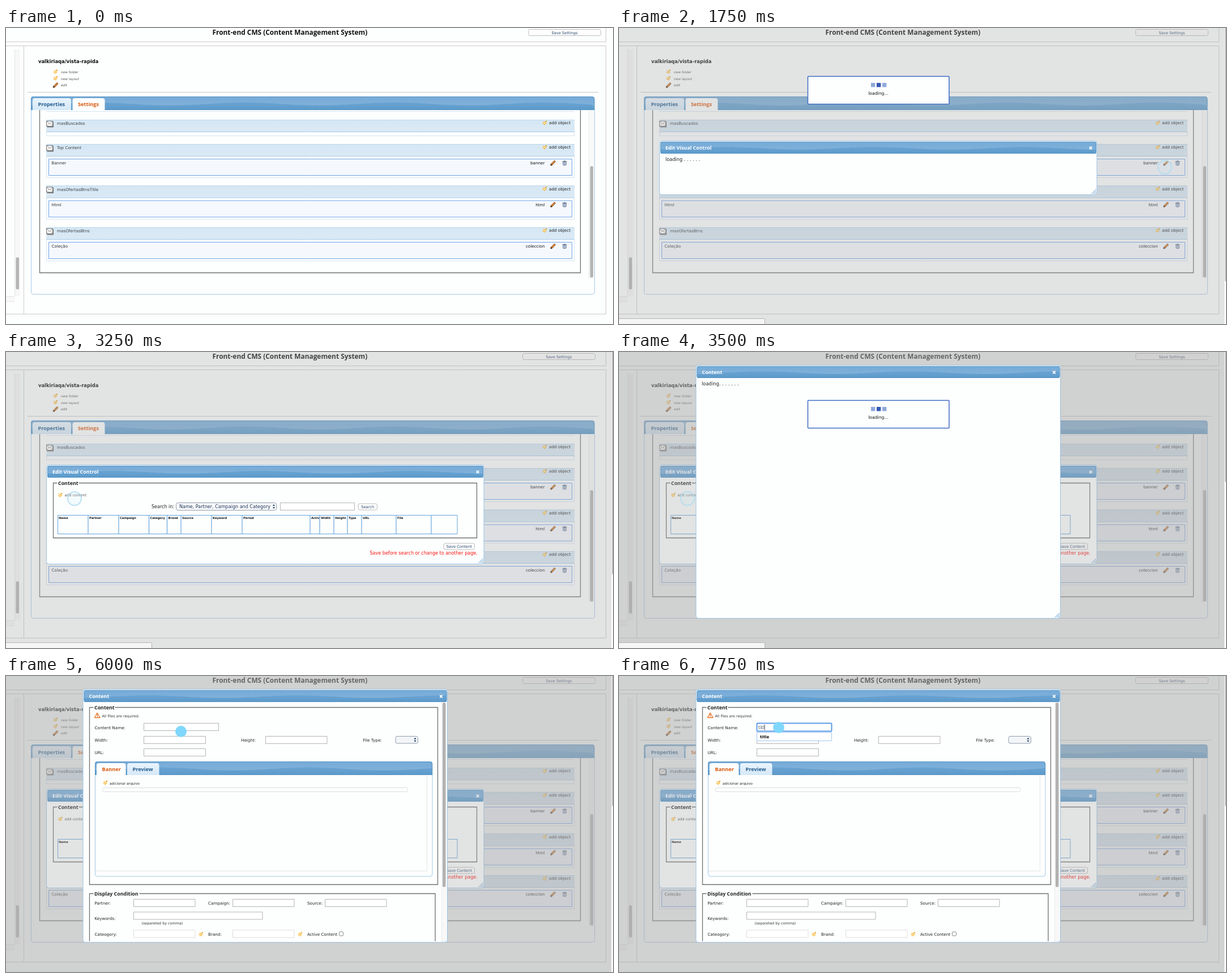
An HTML page with a canvas that plays this animation: 1072 px wide and 523 px high, repeating every 8000 ms.

```html
<!DOCTYPE html>
<html lang="en">
<head>
<meta charset="utf-8">
<title>Front-end CMS</title>
<style>
html, body { margin: 0; width: 100%; height: 100%; overflow: hidden; background: #fdfefe; }
canvas { display: block; width: 1072px; height: 523px; }
</style>
</head>
<body>
<canvas id="stage" width="1072" height="523"></canvas>
<script>
const W = 1072, H = 523, LOOP = 8000, STEP = 250;
const ctx = document.getElementById('stage').getContext('2d');
const BODY = '"DejaVu Sans", Verdana, sans-serif';
const HEAD = '"Open Sans", "Noto Sans", sans-serif';

// Pointer stops: time, x, y, pressed
const POINTER = [
  [250, 1064, 322, 0], [500, 1030, 285, 0], [750, 988, 240, 0], [1000, 966, 239, 0],
  [1250, 964, 246, 1], [2000, 930, 250, 0], [2250, 700, 262, 0], [2500, 400, 265, 0],
  [2750, 180, 262, 0], [3000, 121, 259, 0], [3250, 121, 259, 1], [3750, 144, 263, 0],
  [4000, 270, 200, 0], [4250, 409, 122, 0], [4500, 345, 101, 0], [4750, 313, 98, 0],
  [5250, 309, 98, 0], [6500, 298, 95, 0], [6750, 282, 91, 1], [7000, 282, 91, 0]
];
const TYPED = [[7000, ''], [7250, 't'], [7500, 'tit'], [7750, 'titl']];

const latest = (list, t) => list.filter(e => e[0] <= t).pop();

function text(s, x, y, size = 7.2, color = '#222', o = {}) {
  ctx.font = `${o.style || ''} ${size}px ${o.font || BODY}`;
  ctx.textAlign = o.align || 'left';
  ctx.fillStyle = color;
  ctx.fillText(s, x, y);
}
const title = (s, x, y, size, color) => text(s, x, y, size, color, { style: 'bold', font: HEAD });

function fill(x, y, w, h, color) {
  ctx.fillStyle = color;
  ctx.fillRect(x, y, w, h);
}

function line(color, width, ...pts) {
  ctx.beginPath();
  for (let i = 0; i < pts.length; i += 2) ctx.lineTo(pts[i], pts[i + 1]);
  ctx.strokeStyle = color;
  ctx.lineWidth = width;
  ctx.stroke();
}

function box(x, y, w, h, stroke, bg, r = 0, width = 1) {
  ctx.beginPath();
  ctx.roundRect(x, y, w, h, r);
  if (bg) { ctx.fillStyle = bg; ctx.fill(); }
  if (stroke) { ctx.strokeStyle = stroke; ctx.lineWidth = width; ctx.stroke(); }
}

function gradient(y0, y1, a, b) {
  const g = ctx.createLinearGradient(0, y0, 0, y1);
  g.addColorStop(0, a);
  g.addColorStop(1, b);
  return g;
}

function star(x, y) {
  ctx.beginPath();
  for (let i = 0; i < 10; i++) {
    const r = i % 2 ? 2 : 4, a = i * Math.PI / 5 - 1;
    ctx.lineTo(x + r * Math.cos(a), y + r * Math.sin(a));
  }
  ctx.closePath();
  ctx.fillStyle = '#f6b32c';
  ctx.fill();
  fill(x - 1.4, y - 1.2, 2.4, 2.4, '#fff3c8');
  fill(x + 2, y - 4, 2, 2, '#e99a1c');
}

function pencil(x, y) {
  line('#7a3f16', 3.4, x - 3.6, y + 3.8, x + 3.8, y - 3.6);
  line('#f29a3d', 1.7, x - 2.2, y + 2.2, x + 3.4, y - 3.2);
  line('#333', 1.5, x - 4.4, y + 4.4, x - 3, y + 3);
}

function trash(x, y) {
  box(x - 2.8, y - 2, 5.6, 6, '#6d7f9b', '#bcc9dc', 1);
  line('#5b6d8b', 1.2, x - 4, y - 2.6, x + 4, y - 2.6);
  line('#5b6d8b', 1, x - 1.2, y - 3.8, x + 1.2, y - 3.8);
  line('#6d7f9b', 0.7, x, y - 1, x, y + 3);
}

function envelope(x, y) {
  fill(x + 1.5, y + 1.5, 11.5, 10, '#777');
  box(x + 0.5, y + 0.5, 11, 9, '#777', '#fff');
  line('#777', 0.9, x + 1, y + 1, x + 6, y + 5.6, x + 11, y + 1);
  line('#999', 0.8, x + 1, y + 9, x + 4.4, y + 4.6);
  line('#999', 0.8, x + 11, y + 9, x + 7.6, y + 4.6);
}

// Blue bar with a soft wave along its middle
function bar(x, y, w, h, r = 3) {
  ctx.save();
  ctx.beginPath();
  ctx.roundRect(x, y, w, h, r);
  ctx.clip();
  fill(x, y, w, h, gradient(y, y + h, '#76abd8', '#83b3da'));
  ctx.beginPath();
  ctx.moveTo(x, y + h);
  for (let i = 0; i <= w; i += 4) ctx.lineTo(x + i, y + h * (0.55 + 0.11 * Math.sin(i / 42 + 2)));
  ctx.lineTo(x + w, y + h);
  ctx.fillStyle = gradient(y + h / 2, y + h, '#68a2d2', '#5b9aca');
  ctx.fill();
  ctx.restore();
  box(x + 0.5, y + 0.5, w - 1, h - 1, '#5594c6', null, r);
}

function tab(s, x, y, w, h, active) {
  box(x, y, w, h, null, active ? '#fdfefe' : gradient(y, y + h, '#e9f4fd', '#d5e8f7'), [4, 4, 0, 0]);
  title(s, x + 9.5, y + 13.5, 9.2, active ? '#d9570c' : '#245b8c');
}

const button = (s, x, y, w, h) => {
  box(x, y, w, h, '#bcbcbc', '#fefefe', 3);
  text(s, x + w / 2, y + h / 2 + 2.5, 6.7, '#27456b', { align: 'center' });
};

const input = (x, y, w, h = 13, color = '#b4b4b4') => box(x + 0.5, y + 0.5, w, h, color, '#fff');

function arrows(x, y) {
  ctx.fillStyle = '#1d3a66';
  for (const d of [-1, 1]) {
    ctx.beginPath();
    ctx.moveTo(x - 2, y + d);
    ctx.lineTo(x + 2, y + d);
    ctx.lineTo(x, y + d * 4);
    ctx.fill();
  }
}

function fieldset(s, x, y, w, h, gap) {
  box(x, y, w, h, '#6f6f6f', null, 0, 1.3);
  fill(x + 7, y - 3, gap, 6, '#fdfefe');
  title(s, x + 8.5, y + 3, 8.85, '#222');
}

function dialog(s, x, y, w, h) {
  box(x + 0.5, y + 0.5, w - 1, h - 1, '#9cc4e2', '#fdfefe', 4);
  bar(x + 2, y + 2, w - 3.5, 21);
  title(s, x + 11, y + 16, 8.9, '#fff');
  const cx = x + w - 11.5, cy = y + 13;
  line('#fff', 1.7, cx - 2.3, cy - 2.3, cx + 2.3, cy + 2.3);
  line('#fff', 1.7, cx - 2.3, cy + 2.3, cx + 2.3, cy - 2.3);
  for (const d of [2, 5, 8]) line('#5f9ccc', 1, x + w - 2 - d, y + h - 2, x + w - 2, y + h - 2 - d);
}

function section(name, y, row, kind) {
  const end = kind ? 59 : 28;
  box(71.5, y + 0.5, 932, end, '#d3e4f2', '#fdfefe');
  fill(71, y, 933, 21, gradient(y, y + 21, '#d6e7f4', '#dae9f5'));
  line('#bdd8ec', 1, 71, y + 0.5, 1004, y + 0.5);
  line('#a5cbe8', 1, 71, y + 21.5, 1004, y + 21.5);
  envelope(71, y + 2);
  text(name, 90, y + 9, 7.2, '#3c4348');
  star(951, y + 6);
  text('add object', 959, y + 8, 7.2, '#222');
  if (!kind) return;
  box(75.5, y + 26.5, 924, 29, '#70a3e8', '#f5f9fe');
  text(row, 80.5, y + 36, 7.2, '#333');
  text(kind, 951.5, y + 36, 7.2, '#111', { align: 'right' });
  pencil(966, y + 33.5);
  trash(986.5, y + 33.5);
}

function page(shift) {
  fill(0, 0, W, H, '#fdfefe');
  title('Front-end CMS (Content Management System)', 364.5, 11.5, 11.9, '#111');
  button('Save Settings', 922.5 - shift, 2.5, 128, 11);
  const grey = '#cbcbcb';
  line(grey, 1, 0, 24.5, 1059.5, 24.5, 1059.5, 0);
  line(grey, 1, 0, 31.5, 1059.5, 31.5, 1059.5, 505.5, 0, 505.5);
  line(grey, 1, 31.5, 31, 31.5, 505);

  fill(15, 38, 10, 436, '#f7f7f7');
  line('#e6e6e6', 1, 15.5, 38, 15.5, 474.5, 0, 474.5);
  fill(0, 475, 15, 9, '#f8f8f8');
  line('#e6e6e6', 1, 0, 483.5, 15, 483.5);
  box(17.5, 405, 5.5, 57, null, '#b4b4b4', 3);

  text('valkiriaqa/vista-rapida', 57, 61.5, 8.4, '#111', { style: 'bold' });
  ['new folder', 'new layout', 'edit'].forEach((s, i) => {
    const y = 77.5 + i * 11.7;
    i < 2 ? star(87, y) : pencil(87.5, y);
    text(s, 97, y + 2.3, 5.8, '#555', { style: 'italic' });
  });
  line('#c6c6c6', 1, 38, 113.5, 1046, 113.5);

  box(44.5, 121.5, 995, 349, '#a6cae4', '#fdfefe', 4);
  line('#d5e5f3', 1, 71, 147.5, 1004, 147.5);
  line('#6f6f6f', 1.3, 59.5, 145, 59.5, 432.5, 1014.5, 432.5, 1014.5, 145);
  fill(1029, 146, 10, 296, '#f8f8f8');
  line('#ebebeb', 1, 1029.5, 146, 1029.5, 442);
  box(1031.5, 244, 5.5, 197, null, '#b4b4b4', 3);
  bar(44, 121, 995, 24, [4, 4, 0, 0]);
  tab('Properties', 47, 124, 68, 21, false);
  tab('Settings', 117.5, 124, 57, 22, true);

  section('masBuscados', 162);
  section('Top Content', 205, 'Banner', 'banner');
  section('masOfertasBtnsTitle', 278.5, 'Html', 'html');
  section('masOfertasBtns', 352, 'Coleção', 'coleccion');
}

const dim = () => fill(0, 0, 1069, H, 'rgba(170,170,170,.33)');

function scrollbar(end) {
  fill(1069, 0, 3, H, '#fafafa');
  box(1070, -4, 6, end + 4, null, '#c1c1c1', 2);
}

function loader() {
  box(333.5, 85.5, 249.5, 49, '#3f6cc4', '#fdfefe', 1, 1.5);
  [0, 1, 2].forEach(i => fill(445 + i * 10, 97, 7.4, 7.4, i === 1 ? '#3459b4' : '#8faadc'));
  text('loading...', 458, 118, 7.7, '#111', { align: 'center' });
}

function searchForm() {
  fieldset('Content', 83.5, 231.5, 748, 97, 38);
  star(95.5, 253);
  text('add content', 103.5, 255, 6.4, '#555');
  text('Search in:', 257, 276, 8, '#222');
  box(300.5, 266.5, 177, 13, '#8b98a8', '#fdfdfd', 3);
  text('Name, Partner, Campaign and Category', 306, 276, 8.05, '#142f56');
  arrows(473, 273);
  input(484, 266, 131);
  button('Search', 622, 268, 33.5, 11);

  const cols = [91, 145, 199, 252.5, 284.5, 309, 363, 417, 537, 554, 579, 603, 628, 689, 751, 797];
  const names = 'Name Partner Campaign Category Brand Source Keyword Period Activ Width Height Type URL File'.split(' ');
  const blue = '#68a6dc';
  box(91.5, 288.5, 705.5, 33, blue, null);
  cols.slice(1, -1).forEach(x => line(blue, 1.2, x, 288, x, 322));
  names.forEach((s, i) => text(s, cols[i] + 2, 295, 5.15, '#111', { style: 'bold' }));
  button('Save Content', 773, 338, 54.5, 11);
  text('Save before search or change to another page.', 642.5, 357.5, 8.05, '#f3120e');
}

function contentForm(typed) {
  ctx.save();
  ctx.beginPath();
  ctx.rect(137, 46, 642, 422.5);
  ctx.clip();
  fill(769, 46, 9, 423, '#f8f8f8');
  line('#ececec', 1, 769.5, 46, 769.5, 469);
  box(771, 47, 5.5, 326, null, '#b2b2b2', 3);

  fieldset('Content', 147.5, 55.5, 615, 313, 38);
  ctx.lineJoin = 'round';
  line('#ec7424', 1.3, 161, 65, 166, 73.5, 156.5, 73.5, 161, 65);
  line('#d9570c', 1.2, 161.2, 67.5, 161.2, 70.5);
  fill(160.6, 71.3, 1.2, 1.2, '#d9570c');
  ctx.lineJoin = 'miter';
  text('All files are required.', 169.5, 72.5, 6.4, '#333');
  text('Content Name:', 156.5, 93.5);
  text('Width:', 156.5, 115.5);
  text('URL:', 156.5, 138);
  text('Height:', 415, 115.5);
  text('File Type:', 630.5, 115.5);
  input(243, 83, 132);
  input(243, 106, 109);
  input(243, 128, 109);
  input(458, 106, 108.5);
  box(688, 106.5, 39.5, 12.5, '#909cab', '#f3f5f8', 3);
  arrows(722.5, 112.8);

  box(157.5, 151.5, 595.5, 202.5, '#a6cae4', '#fdfefe', 4);
  bar(157, 151, 596, 24, [4, 4, 0, 0]);
  tab('Banner', 160, 154, 51.5, 22, true);
  tab('Preview', 214, 154, 56.5, 21, false);
  line('#e3e3e3', 1, 743.5, 176, 743.5, 344.5, 158, 344.5);
  star(175, 189);
  text('adicionar arquivo', 183, 191.5, 6.1, '#222');
  box(170.5, 197.5, 539, 7, '#dcdcdc', '#fdfefe', 3);

  fieldset('Display Condition', 147.5, 384.5, 610.5, 110, 81);
  text('Partner:', 156.5, 404);
  text('Campaign:', 357, 404);
  text('Source:', 532, 404);
  text('Keywords:', 156.5, 431);
  text('(separeted by comma)', 239.5, 439, 6.4, '#333');
  text('Cateogory:', 156.5, 458.5);
  text('Brand:', 357, 458.5);
  text('Active Content', 532, 458.5);
  [225, 400, 563].forEach(x => input(x, 394, 108.5));
  input(225, 416.5, 227.5);
  [225, 400].forEach(x => {
    input(x, 448.5, 108.5, 13, '#dedede');
    star(x + 119, 456.5);
  });
  box(588.5, 452, 7, 7, '#858585', '#fff', 1.5);

  if (typed !== undefined) {
    if (typed) {
      box(243.5, 99.5, 132, 15, '#a3c8ef', '#fff');
      text('title', 249, 110, 7, '#111', { style: 'bold' });
    }
    box(243.5, 83.5, 132, 14, '#5d9be6', '#fff', 1, 2);
    text(typed, 246, 93.5, 8, '#52616f');
    const end = 246.5 + ctx.measureText(typed).width;
    line('#222', 0.8, end, 86, end, 95.5);
  }
  ctx.restore();
}

function pointer(t) {
  const p = latest(POINTER, t);
  if (!p) return;
  ctx.beginPath();
  ctx.arc(p[1], p[2], p[3] ? 12 : 10, 0, 2 * Math.PI);
  if (p[3]) {
    ctx.fillStyle = 'rgba(200,232,246,.18)';
    ctx.fill();
    ctx.strokeStyle = 'rgba(175,221,240,.85)';
    ctx.lineWidth = 2;
    ctx.stroke();
  } else {
    ctx.fillStyle = '#80d7fc';
    ctx.fill();
  }
}

function draw(t) {
  const editing = t >= 1750, listed = t >= 2500, adding = t >= 3500, ready = t >= 6000;
  page(editing ? 10 : 0);
  if (editing) {
    dim();
    dialog('Edit Visual Control', 71, 199, 773.5, listed ? 176 : 96);
    if (listed) searchForm();
    else text('loading . . . . . .', 82, 234.5, 8.2, '#222');
  }
  if (adding) {
    dim();
    dialog('Content', 135.5, 23, 644.5, 448);
    if (ready) contentForm((latest(TYPED, t) || [])[1]);
    else text('loading. . . . . . .', 146, 58.5, 8.4, '#222');
  }
  if (editing && !listed || adding && !ready) loader();
  if (editing) scrollbar(adding ? 230 : listed ? 393 : 448);
  if (t >= 1500 && t < 3750) box(-3, 513.5, 260.5, 14, '#b2b2b2', editing ? '#f5f5f5' : '#ececec', 2);
  pointer(t);
}

function tick(now) {
  draw(Math.floor(now % LOOP / STEP) * STEP);
  requestAnimationFrame(tick);
}
draw(0);
requestAnimationFrame(tick);
</script>
</body>
</html>
```
